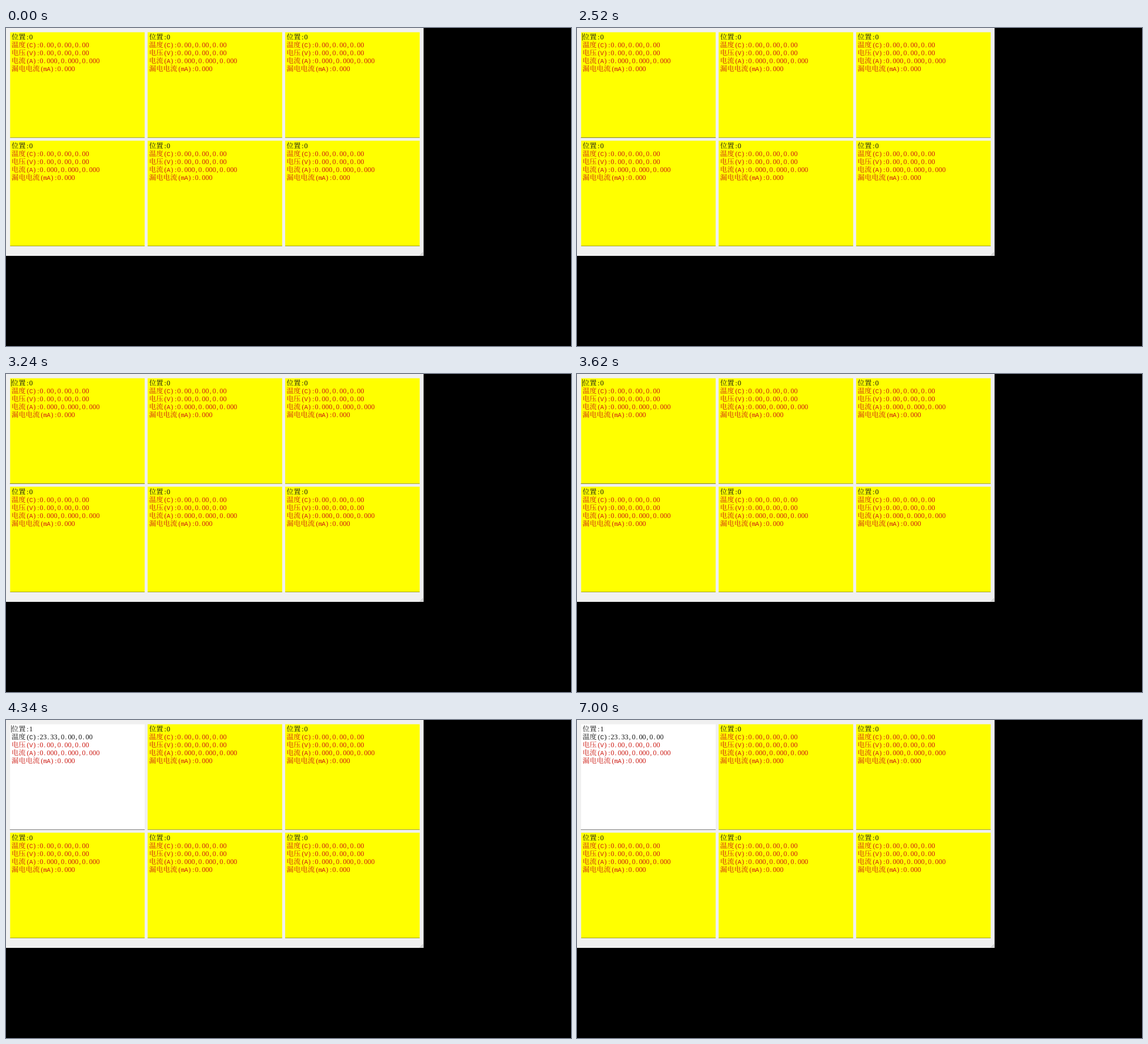
An HTML page for the animation above (8000 ms loop, 998x561 px).

```html
<!DOCTYPE html>
<html lang="zh-CN">
<head>
<meta charset="utf-8">
<title>监测面板</title>
<style>
  html, body { margin: 0; width: 100%; height: 100%; overflow: hidden; background: #000; }
  svg { display: block; width: 998px; height: 561px; }
  text { font-size: 12.45px; text-rendering: geometricPrecision; fill: #cc1a12; }
  text.dark { fill: #111; }
  .han { font-family: "Noto Serif CJK SC", "Noto Sans CJK SC", "Noto Sans CJK", sans-serif; font-weight: 300; }
  .num { font-family: "Liberation Serif", "Noto Serif", serif; }
  .abc { font-family: "Liberation Mono", monospace; font-size: 11px; }
</style>
</head>
<body>
<svg id="stage" viewBox="0 0 998 561" xmlns="http://www.w3.org/2000/svg">
  <rect width="737.6" height="402" fill="#f0f0f0"/>
  <path d="M731 401.5L737 395.5M733.3 401.5L737 397.8M735.6 401.5L737 400.1" stroke="#b4b4b4" stroke-width="1"/>
  <g id="panels"></g>
  <rect id="caret" x="9.1" y="9.3" width=".75" height="12.7" fill="#000"/>
  <path id="pointer" d="M0 0V17L4 13.2 6.6 19 9 18 6.5 12.2H12Z" fill="#fff" stroke="#222" stroke-width="1.2"/>
</svg>
<script>
const LOOP = 8000;
const COL = 242.9, ROW = 191.3, LINE = 14, EM = 12.45;
const FOCUS = 2520, READING = 4040, CARET_OFF = 7000;
const POINTER_IN = 3080, POINTER_HOLD = 3100, POINTER_OUT = 3160;
const NUDGE = { '(': 2, ')': 1, ':': 1.8, ',': 1, '.': 1 };

const $ = id => document.getElementById(id);

function add(parent, tag, attrs = {}) {
  const el = document.createElementNS('http://www.w3.org/2000/svg', tag);
  for (const k in attrs) el.setAttribute(k, attrs[k]);
  return parent.appendChild(el);
}

const kind = c => c > '\u00ff' ? 'han' : /[A-Za-z]/.test(c) ? 'abc' : 'num';

// Latin characters take half of a Han cell.
function drawLine(parent, str, x, y, dark) {
  const xs = [];
  const text = add(parent, 'text', { y, class: dark ? 'dark' : '' });
  for (const c of str) {
    const type = kind(c);
    xs.push((x + (NUDGE[c] || 0)).toFixed(2));
    x += type === 'han' ? EM : EM / 2;
    add(text, 'tspan', { class: type }).textContent = c;
  }
  text.setAttribute('x', xs.join(' '));
}

function drawReadings(parent, slot, temp, x, y, darkLines) {
  [
    `位置:${slot}`,
    `温度(C):${temp},0.00,0.00`,
    '电压(V):0.00,0.00,0.00',
    '电流(A):0.000,0.000,0.000',
    '漏电电流(mA):0.000'
  ].forEach((s, i) => drawLine(parent, s, x + 2.5, y + 12.8 + i * LINE, i < darkLines));
}

function drawPanel(i) {
  const x = 7.3 + (i % 3) * COL, y = 7.5 + Math.floor(i / 3) * ROW;
  const g = add($('panels'), 'g');
  const box = add(g, 'rect', { x, y, width: 237.6, height: 186, fill: '#ff0' });
  const rim = add(g, 'rect', { x, y: y + 185.4, width: 237.6, height: .8, fill: '#000', opacity: .45 });
  const idle = add(g, 'g');
  drawReadings(idle, 0, '0.00', x, y, 1);
  return { g, box, rim, idle, x, y };
}

const first = [0, 1, 2, 3, 4, 5].map(drawPanel)[0];
const live = add(first.g, 'g');
drawReadings(live, 1, '23.33', first.x, first.y, 2);

const show = (el, on) => el.setAttribute('visibility', on ? 'visible' : 'hidden');

function render(t) {
  const focused = t >= FOCUS, reading = t >= READING;
  first.box.setAttribute('fill', reading ? '#fff' : '#ff0');
  first.rim.setAttribute('x', focused ? 6.8 : first.x);
  first.rim.setAttribute('width', focused ? 238.2 : 237.6);
  first.rim.setAttribute('opacity', focused ? .65 : .45);
  show(first.idle, !reading);
  show(live, reading);
  show($('caret'), focused && t < CARET_OFF);

  const out = Math.max(0, (t - POINTER_HOLD) / (POINTER_OUT - POINTER_HOLD));
  show($('pointer'), t >= POINTER_IN && t < POINTER_OUT);
  $('pointer').setAttribute('transform', `translate(${462.4 + 12 * out} ${-7 - 7 * out}) scale(.65)`);
}

const start = performance.now();
function tick() {
  render((performance.now() - start) % LOOP);
  requestAnimationFrame(tick);
}
tick();
</script>
</body>
</html>
```
